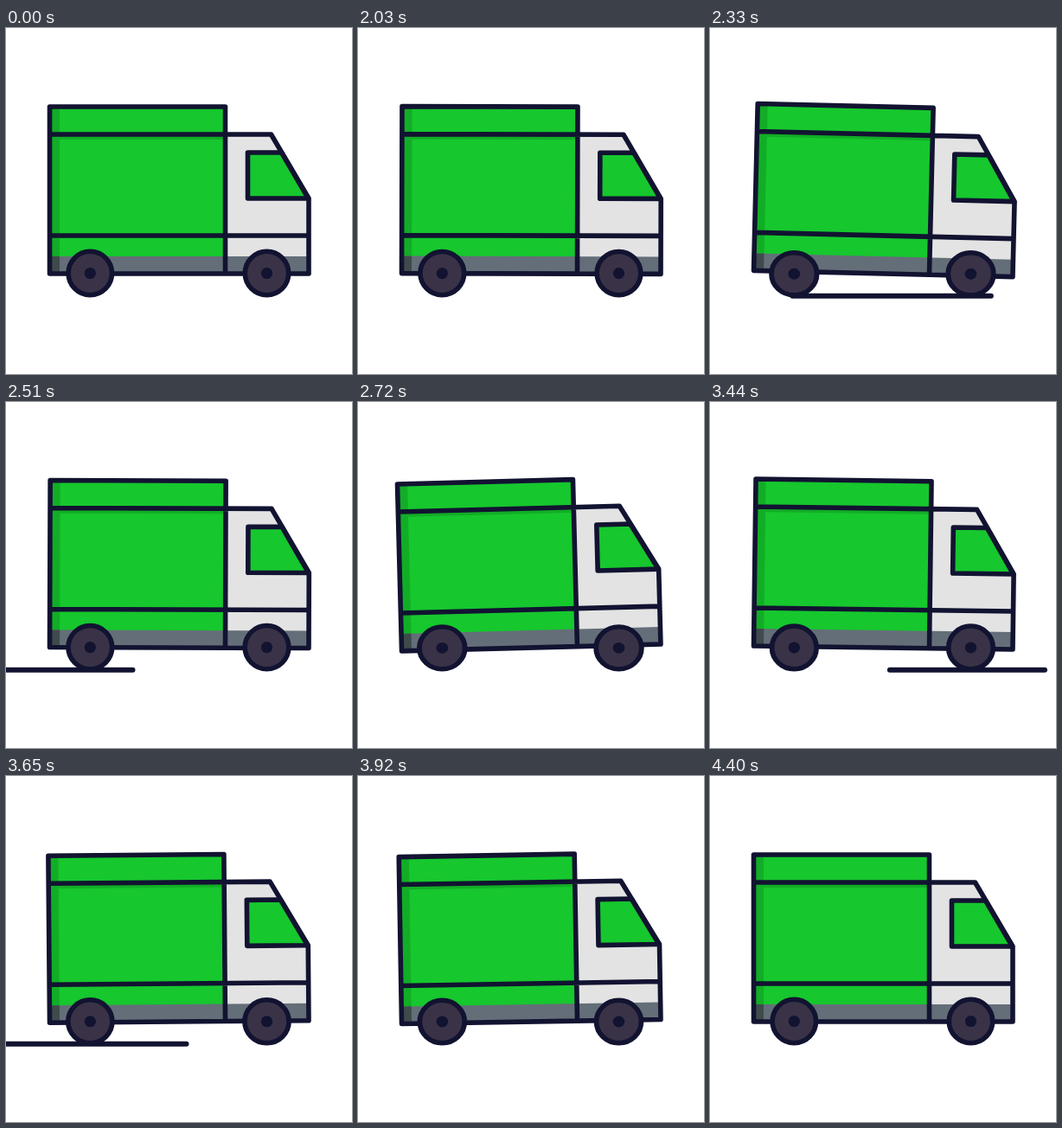
An HTML page that plays this animation: 400 px wide and 400 px high, repeating every 4.49 s.

```html
<!DOCTYPE html>
<html lang="en">
<head>
<meta charset="utf-8">
<title>Delivery truck</title>
<style>
  html, body { margin: 0; height: 100%; overflow: hidden; background: #fff; }
  svg { display: block; width: 100%; height: 100%; }
  .ink { stroke: #121331; stroke-width: 5.6; stroke-linecap: round; stroke-linejoin: round; fill: none; }
</style>
</head>
<body>
<svg viewBox="0 0 400 400">
  <defs>
    <g id="wheel">
      <circle class="ink" r="25.2" style="fill:#3a3347"/>
      <circle r="6.6" fill="#121331"/>
    </g>
  </defs>
  <path id="road" class="ink" style="stroke-width:6"/>
  <g id="body">
    <path fill="#16c72e" d="M50.5 91H253.5V284H50.5Z"/>
    <path fill="#12ad26" d="M50.5 91H62V264H50.5ZM50.5 123H253.5V129H50.5Z"/>
    <path fill="#e3e3e3" d="M253.5 123H306.5L350 197V284H253.5Z"/>
    <path fill="#646e78" d="M50.5 264H350V284H50.5Z"/>
    <path fill="#3f4a4c" d="M50.5 264H62V284H50.5Z"/>
    <path class="ink" d="M50.5 91H253.5V284H50.5ZM50.5 123H306.5L350 197V284H253.5M50.5 240H350"/>
    <path class="ink" style="fill:#16c72e" d="M279.5 144H318.5L349.5 197H279.5Z"/>
  </g>
  <use id="rear" href="#wheel"/>
  <use id="front" href="#wheel"/>
</svg>
<script>
const LOOP = 4490, START = 2030, END = 4400, STEP = 30;
const TILT = [[1960, 0], [2310, 1.4], [2770, -1.6], [3270, 1.25], [3840, -1.08], [4260, 0]];
const PASSES = [2000, 3200];
const GROUND = 311.5;

const $ = id => document.getElementById(id);
const ease = u => {
  u = Math.min(1, Math.max(0, u));
  return u * u * (3 - 2 * u);
};

function tiltAt(t) {
  for (let i = 1; i < TILT.length; i++) {
    const [t0, a] = TILT[i - 1], [t1, b] = TILT[i];
    if (t < t1) return a + (b - a) * ease((t - t0) / (t1 - t0));
  }
  return 0;
}

// One road line per pass: its left end leads, its right end follows.
function roadAt(t) {
  const start = PASSES.findLast(p => t >= p);
  if (start === undefined) return '';
  const x = (delay, span) => 410 - 430 * ease((t - start - delay) / span);
  return `M${x(0, 500)} 309.7H${x(153, 620)}`;
}

function draw(t) {
  const moving = t >= START && t < END;
  const time = START + Math.floor((t - START) / STEP) * STEP;
  const tilt = moving ? tiltAt(time) : 0;
  const squash = Math.abs(tilt);
  $('body').setAttribute('transform', `rotate(${tilt} 200 284)`);
  $('road').setAttribute('d', moving ? roadAt(time) : '');
  for (const [id, x] of [['rear', 97.3], ['front', 301.5]]) {
    $(id).setAttribute('transform',
      `translate(${x} ${GROUND}) scale(${1 + 0.03 * squash} ${1 - 0.02 * squash}) translate(0 -28)`);
  }
}

function frame() {
  draw(performance.now() % LOOP);
  requestAnimationFrame(frame);
}
frame();
</script>
</body>
</html>
```
